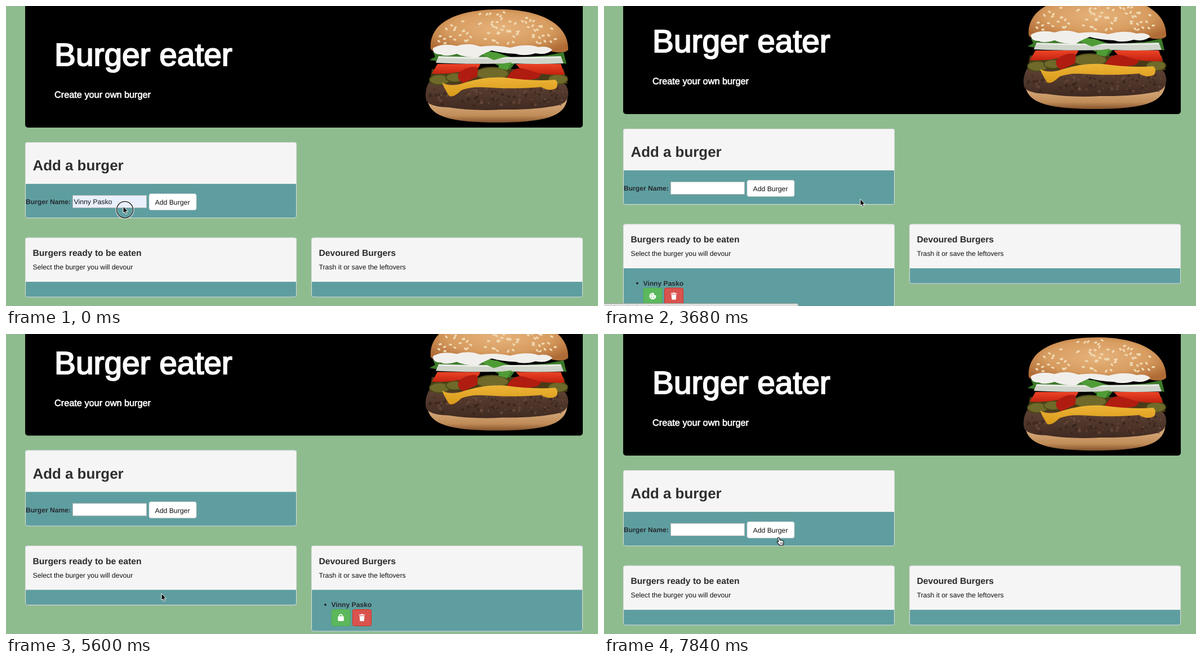
Write an HTML page that moves like this. It is 1051 px wide and 533 px high and loops after 8000 ms.

```html
<!DOCTYPE html>
<html lang="en">
<head>
<meta charset="utf-8">
<title>Burger eater</title>
<style>
  html, body { margin: 0; width: 100%; height: 100%; overflow: hidden; background: #8fbc8f; }
  svg { display: block; width: 1051px; height: 533px; font-family: "Liberation Sans", Arial, sans-serif; }
  text { white-space: pre; text-rendering: geometricPrecision; }
  .title { font-size: 56.8px; fill: #fff; stroke: #fff; stroke-width: 2px; }
  .lead { font-size: 16.3px; fill: #fff; stroke: #fff; stroke-width: .65px; }
  .big { font: bold 25.9px "Liberation Sans", Arial, sans-serif; fill: #2e2e2e; }
  .head { font: bold 15.65px "Liberation Sans", Arial, sans-serif; fill: #2a2a2a; }
  .bold { font: bold 12.1px "Liberation Sans", Arial, sans-serif; fill: #262b30; }
  .body { font-size: 12.25px; fill: #111; }
</style>
</head>
<body>
<svg viewBox="0 0 1051 533">
  <defs>
    <radialGradient id="bun" cx=".5" cy=".45" r=".62">
      <stop offset="0" stop-color="#e6b37c"/><stop offset=".6" stop-color="#d79c60"/><stop offset="1" stop-color="#b06c36"/>
    </radialGradient>
    <linearGradient id="base" x2="0" y2="1">
      <stop offset=".4" stop-color="#d0a272"/><stop offset=".75" stop-color="#c08c58"/><stop offset="1" stop-color="#85532c"/>
    </linearGradient>
    <linearGradient id="meat" x2="0" y2="1">
      <stop offset="0" stop-color="#5e4234"/><stop offset="1" stop-color="#402a21"/>
    </linearGradient>
    <linearGradient id="tomato" x2="0" y2="1">
      <stop offset="0" stop-color="#ec4426"/><stop offset="1" stop-color="#c3200f"/>
    </linearGradient>
    <linearGradient id="cheese" x2="0" y2="1">
      <stop offset="0" stop-color="#edb437"/><stop offset="1" stop-color="#d99a18"/>
    </linearGradient>
  </defs>

  <g id="page">
    <rect x="34" y="-60" width="990" height="276" rx="5"/>
    <text class="title" x="86" y="106">Burger eater</text>
    <text class="lead" x="86" y="163">Create your own burger</text>

    <g id="burger">
      <path fill="url(#base)" d="M747 158C748 190 770 207 872 207S996 190 997 158Z"/>
      <path fill="url(#meat)" d="M752 134Q742 150 746 168Q752 179 785 180Q830 187 880 184Q940 185 982 176Q1000 170 998 152Q996 138 985 134Z"/>
      <g id="crumbs"/>
      <path fill="#4a3a17" d="M756 112H990L997 138H752Z"/>
      <g fill="#6f6a2a" stroke="#4c4a1a" stroke-width="2">
        <ellipse cx="770" cy="131" rx="18" ry="9"/><ellipse cx="863" cy="120" rx="29" ry="11"/>
        <ellipse cx="980" cy="130" rx="17" ry="9"/><ellipse cx="797" cy="127" rx="16" ry="8"/>
      </g>
      <path fill="url(#tomato)" d="M766 103H842Q838 120 806 117Q780 122 756 120ZM905 103H985L992 122Q955 124 915 114Z"/>
      <path fill="#b01c10" d="M803 120Q815 108 834 108Q840 112 836 126L812 137Q800 132 803 120ZM888 130Q900 105 922 112L950 121Q946 130 935 130L900 136Z"/>
      <path fill="url(#cheese)" d="M774 136Q790 145 815 136Q850 125 885 127Q935 134 975 131Q982 136 977 146Q965 153 950 144Q900 148 860 145Q825 142 808 150Q795 163 787 160Q780 150 774 136Z"/>
      <path fill="#3c7a2a" d="M758 82L785 78 840 88 870 82 900 92 960 88 990 82 995 103 975 98 905 100 895 113 880 110 865 101 780 100 752 96 762 90Z"/>
      <path fill="#cfd5cb" d="M768 89Q870 92 985 89L990 102Q940 104 900 102 820 104 763 101Z"/>
      <path fill="none" stroke="#eef0ea" stroke-width="2" d="M768 91Q870 94 985 91"/>
      <path fill="#4f9c36" d="M838 82Q860 76 888 90L866 96 850 89ZM876 103L898 100 890 114 874 110Z"/>
      <path fill="url(#bun)" d="M754 76C750 30 800 6 876 6C955 6 1000 36 998 78Q990 86 965 80Q870 72 775 80Q758 84 754 76Z"/>
      <g id="seeds" fill="#f0d9b2"/>
      <path fill="#f1efec" d="M758 75Q775 65 800 71Q820 64 842 72Q870 68 895 74Q925 66 945 73Q962 70 970 78Q960 88 940 84Q920 90 905 85Q880 84 862 79Q848 84 838 91Q815 92 800 85Q780 91 772 86Q757 86 758 75Z"/>
    </g>

    <g id="cards"></g>
    <text class="big" x="47.5" y="292">Add a burger</text>
    <text class="bold" x="35" y="352">Burger Name:</text>
    <rect id="field" x="118.5" y="336.5" width="131" height="22" stroke="#b5b5b5"/>
    <g id="focus" fill="none" stroke="#4c98ee">
      <rect x="117.5" y="335.5" width="133" height="24" rx="2" stroke-width="3" opacity=".55"/>
      <rect x="118.5" y="336.5" width="131" height="22" rx="1" stroke-width="1.5"/>
    </g>
    <text class="body" id="typed" x="120.5" y="352">Vinny Pasko</text>
    <rect id="caret" x="190" y="340" width="1" height="14"/>
    <rect x="254" y="333.5" width="84" height="29" rx="3.5" fill="#fff" stroke="#ccc" stroke-width=".6"/>
    <text class="body" x="264.5" y="353">Add Burger</text>

    <text class="head" x="47.5" y="444">Burgers ready to be eaten</text>
    <text class="body" x="47.5" y="468">Select the burger you will devour</text>
    <text class="head" x="555.5" y="444">Devoured Burgers</text>
    <text class="body" x="555.5" y="468">Trash it or save the leftovers</text>
    <g id="items"></g>
  </g>

  <g id="status">
    <rect x="-5" y="528.5" width="350" height="22" rx="3" fill="#dedede" stroke="#8e9a8e"/>
    <text x="2" y="540" font-size="11" fill="#777">Waiting for localhost...</text>
  </g>

  <g id="cursor">
    <g id="ring" fill="none">
      <circle r="15" stroke="#fff" stroke-width="2.6"/>
      <circle r="14.6" stroke="#111" stroke-width="1.3"/>
    </g>
    <path id="arrow" d="M-3 -6V6L-.3 3.6L1.6 8L3.6 7.1L1.7 2.9H5.4Z" stroke="#fff" stroke-width="1"/>
    <g id="hand" fill="#fff" stroke="#111" stroke-width="1.1" stroke-linejoin="round">
      <path d="M-3.2 1.6L-4.5-5.2Q-4.4-6.9-3-6.7Q-2-6.5-1.7-5.2L-.8-1.6Q.5-2.6 1.7-1.3Q3-2 3.8-.6Q5.6-.9 5.9 1Q6.2 4.6 4.6 7.4H-1.2Q-2.6 5.2-5.4 2.6Q-6.3 1.3-5.2.6Q-4 .3-3.2 1.6Z"/>
      <path d="M.2 2.2V5.2M2 2.2V5.2M3.8 2.2V5.2" stroke-width=".7"/>
    </g>
  </g>
</svg>

<script>
const LOOP = 8000, STEP = 160;
const $ = id => document.getElementById(id);
const show = (id, on) => $(id).setAttribute("visibility", on ? "inherit" : "hidden");
const within = (t, ...spans) => spans.some(([a, b]) => t >= a && t < b);

let seed = 11;
const rand = () => (seed = seed * 16807 % 2147483647) / 2147483647;

// Sesame seeds follow the dome; crumbs fill the patty.
for (let i = 0; i < 75; i++) {
  const a = Math.PI * rand(), r = Math.sqrt(rand());
  const x = 876 + 108 * r * Math.cos(a), y = 66 - 55 * r * Math.sin(a);
  $("seeds").innerHTML += `<ellipse cx="${x}" cy="${y}" rx="3" ry="1.7" transform="rotate(${rand() * 120 - 60} ${x} ${y})"/>`;
}
for (let i = 0; i < 130; i++) {
  const x = 752 + 240 * rand(), y = 143 + 34 * rand();
  $("crumbs").innerHTML += `<circle cx="${x}" cy="${y}" r="${1 + 2 * rand()}" opacity=".45" fill="${rand() < .5 ? "#7a5848" : "#2c1a13"}"/>`;
}

// A panel: light header, teal body, thin border.
const card = (id, x, y, split, end) => `<g id="${id}">
  <rect x="${x}" y="${y}" width="482" height="${end - y}" rx="4" fill="#5f9ea0"/>
  <path d="M${x} ${split}V${y + 4}q0-4 4-4h474q4 0 4 4V${split}z" fill="#f5f5f5"/>
  <rect x="${x + .5}" y="${y + .5}" width="481" height="${end - y - 1}" rx="3.5" fill="none" stroke="#ddd"/></g>`;
$("cards").innerHTML = card("form", 34, 242, 316, 377) +
  card("readyShort", 34, 411.5, 490, 517.5) + card("readyTall", 34, 411.5, 490, 564) +
  card("eatenShort", 542, 411.5, 490, 517.5) + card("eatenTall", 542, 411.5, 490, 564);

const cookie = `<circle r="6" fill="#fff"/><circle cx="5" cy="-4.6" r="3" fill="#5cb85c"/>
  <g fill="#5cb85c"><circle cx="-1.6" cy="-2.4" r="1"/><circle cx="-2.2" cy="2.2" r="1"/><circle cx="2" cy="1.8" r="1"/></g>`;
const bag = `<path d="M-5.2-2.4H5.2V4.4q0 1.6-1.6 1.6H-3.6q-1.6 0-1.6-1.6z" fill="#fff"/>
  <path d="M-2.5-.5V-3.2a2.5 2.5 0 0 1 5 0V-.5" fill="none" stroke="#fff" stroke-width="1.4"/>`;
const bin = `<path d="M-5.2-5.6H-2l.6-.9H1.4l.6.9H5.2v1.6H-5.2zM-4.4-3.1H4.4L3.8 5q-.1 1.3-1.4 1.3H-2.4Q-3.7 6.3-3.8 5z" fill="#fff"/>`;
const button = (x, fill, line, icon) => `<rect x="${x + .5}" y="525" width="33" height="29" rx="3" fill="${fill}" stroke="${line}"/>
  <g transform="translate(${x + 17} 539.5)">${icon}</g>`;
const item = (id, x, icon) => `<g id="${id}" transform="translate(${x})">
  <circle cx="59" cy="516.5" r="2" fill="#262b30"/><text class="bold" x="69.5" y="520.5">Vinny Pasko</text>
  ${button(69.5, "#5cb85c", "#4cae4c", icon)}${button(107, "#d9534f", "#d4301f", bin)}</g>`;
$("items").innerHTML = item("ready", 0, cookie) + item("eaten", 508, bag);

// Each row: time, then values; straight lines between rows.
const path = [
  [0, 211, 362], [320, 211, 362], [960, 300, 357], [2080, 300, 357], [2560, 304, 359],
  [3360, 304, 359], [3680, 458, 349], [3840, 458, 349], [4320, 221, 462], [4640, 87, 506],
  [5440, 87, 506], [5600, 279, 467], [6080, 628, 508], [7040, 627, 508], [7360, 450, 440],
  [7520, 450, 440], [7840, 313, 368], [LOOP, 313, 368]
];
const scroll = [[0, 0], [3520, 0], [3680, 24], [4000, 35.5], [7199, 35.5], [7200, 0], [LOOP, 0]];

function at(rows, t) {
  const i = Math.max(1, rows.findIndex(r => r[0] > t));
  const a = rows[i - 1], b = rows[i], k = (t - a[0]) / (b[0] - a[0]);
  return a.slice(1).map((v, n) => v + (b[n + 1] - v) * k);
}

function draw(t) {
  const [x, y] = at(path, t);
  $("page").setAttribute("transform", `translate(0 ${-at(scroll, t)[0]})`);
  $("cursor").setAttribute("transform", `translate(${x} ${y})`);

  const filled = t < 3040;
  const ready = within(t, [3040, 5120]), eaten = within(t, [5120, 7040]);
  const hand = within(t, [800, 3520], [4640, 5120], [6080, 7200], [7840, LOOP]);
  $("field").setAttribute("fill", filled ? "#e8f0fe" : "#fff");
  show("typed", filled);
  show("focus", within(t, [160, 3040]));
  show("caret", within(t, [160, 960], [1440, 1760], [2240, 2720]));
  show("ready", ready);
  show("readyTall", ready);
  show("readyShort", !ready);
  show("eaten", eaten);
  show("eatenTall", eaten);
  show("eatenShort", !eaten);
  show("page", !within(t, [7040, 7200]));
  show("status", within(t, [2880, 3840]));
  show("hand", hand);
  show("arrow", !hand);
  show("ring", within(t, [0, 320], [2720, 3040], [4800, 5120], [6400, 6720]));
}

const start = performance.now();
function tick() {
  const t = (performance.now() - start) % LOOP;
  draw(Math.floor(t / STEP) * STEP);
  requestAnimationFrame(tick);
}
tick();
</script>
</body>
</html>
```
